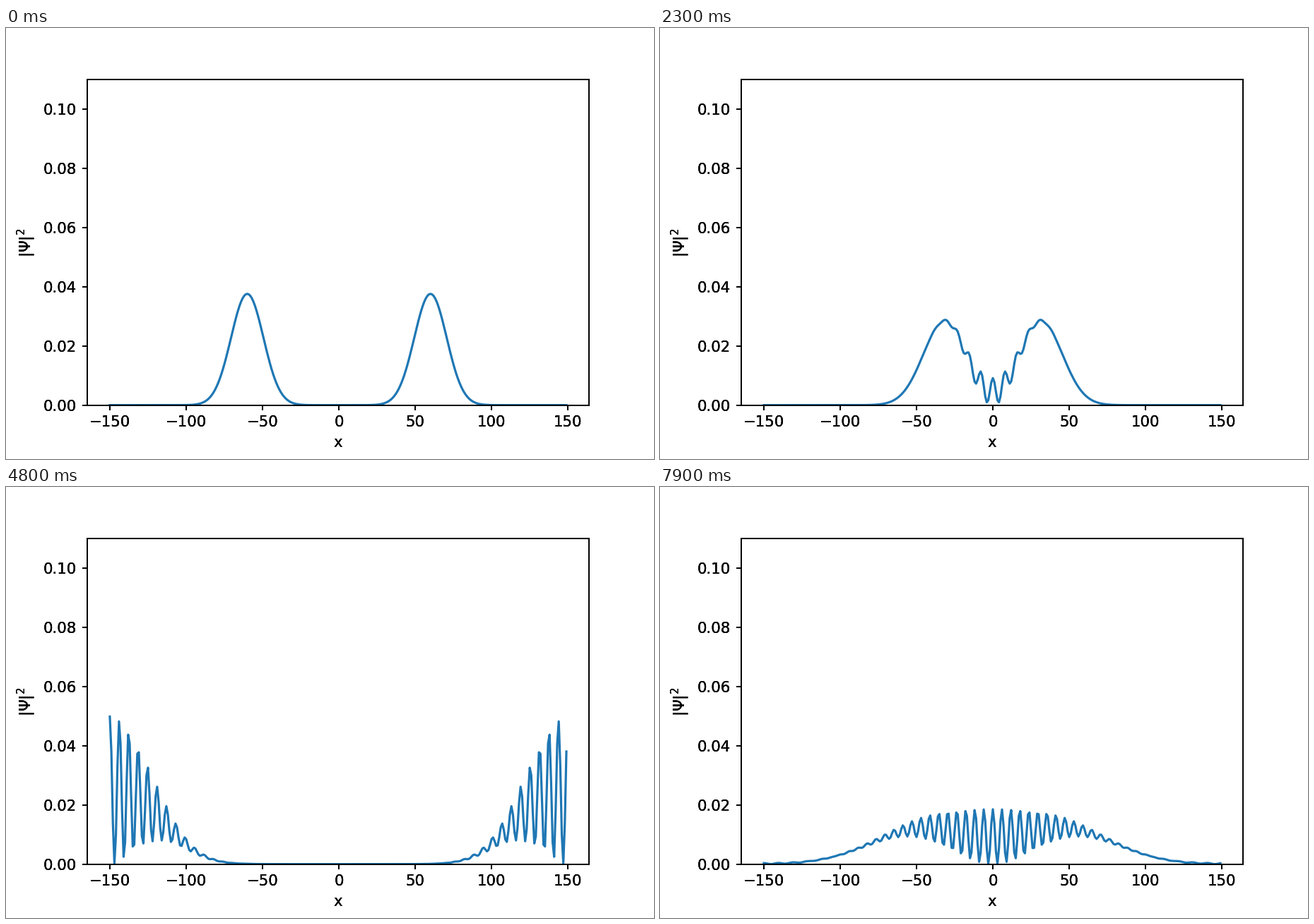
Animation of 917x611 px, one loop 8 s. Source, as a matplotlib script:

```python
import numpy as np
import matplotlib.pyplot as plt
from matplotlib.animation import FuncAnimation

plt.rcParams["font.family"] = "DejaVu Sans"

WIDTH, HEIGHT, DPI = 917, 611, 152.8
FRAMES, INTERVAL = 80, 100

# Two free wave packets on a periodic grid (hbar = m = 1)
X = np.arange(-150, 150)
START = 60
SPREAD = 15
K0 = 3 * np.pi / 20
TIME_STEP = 8.44


def packet(center, k):
    """Normalised Gaussian packet with mean wave number k."""
    d = X - center
    norm = (np.pi * SPREAD**2) ** -0.25
    return norm * np.exp(-(d / SPREAD) ** 2 / 2 + 1j * k * d)


K = 2 * np.pi * np.fft.fftfreq(X.size)
SPECTRUM = np.fft.fft(packet(-START, K0) + packet(START, -K0))


def density(frame):
    """Probability density after exact spectral propagation."""
    phase = np.exp(-0.5j * K**2 * TIME_STEP * frame)
    return np.abs(np.fft.ifft(SPECTRUM * phase)) ** 2


def add_axes(fig):
    ax = fig.add_axes([0.125, 0.125, 0.775, 0.755])
    ax.patch.set_visible(False)
    margin = 0.05 * (X[-1] - X[0])
    ax.set_xlim(X[0] - margin, X[-1] + margin)
    ax.set_ylim(0, 0.11)
    ax.set_xlabel("x")
    ax.set_ylabel(r"$|\Psi|^2$")
    return ax


# The small excess keeps the pixel size from rounding down
fig = plt.figure(figsize=((WIDTH + 0.01) / DPI, (HEIGHT + 0.01) / DPI), dpi=DPI,
                 facecolor="white")

# Stacked axes give the labels their hard, dark edges
ax = [add_axes(fig) for _ in range(3)][0]
line, = ax.plot(X, density(0), color="#1f77b4", lw=1.5)


def update(frame):
    line.set_ydata(density(frame))
    return line,


anim = FuncAnimation(fig, update, frames=FRAMES, interval=INTERVAL,
                     repeat=True, repeat_delay=0, blit=False)
plt.show()
```
